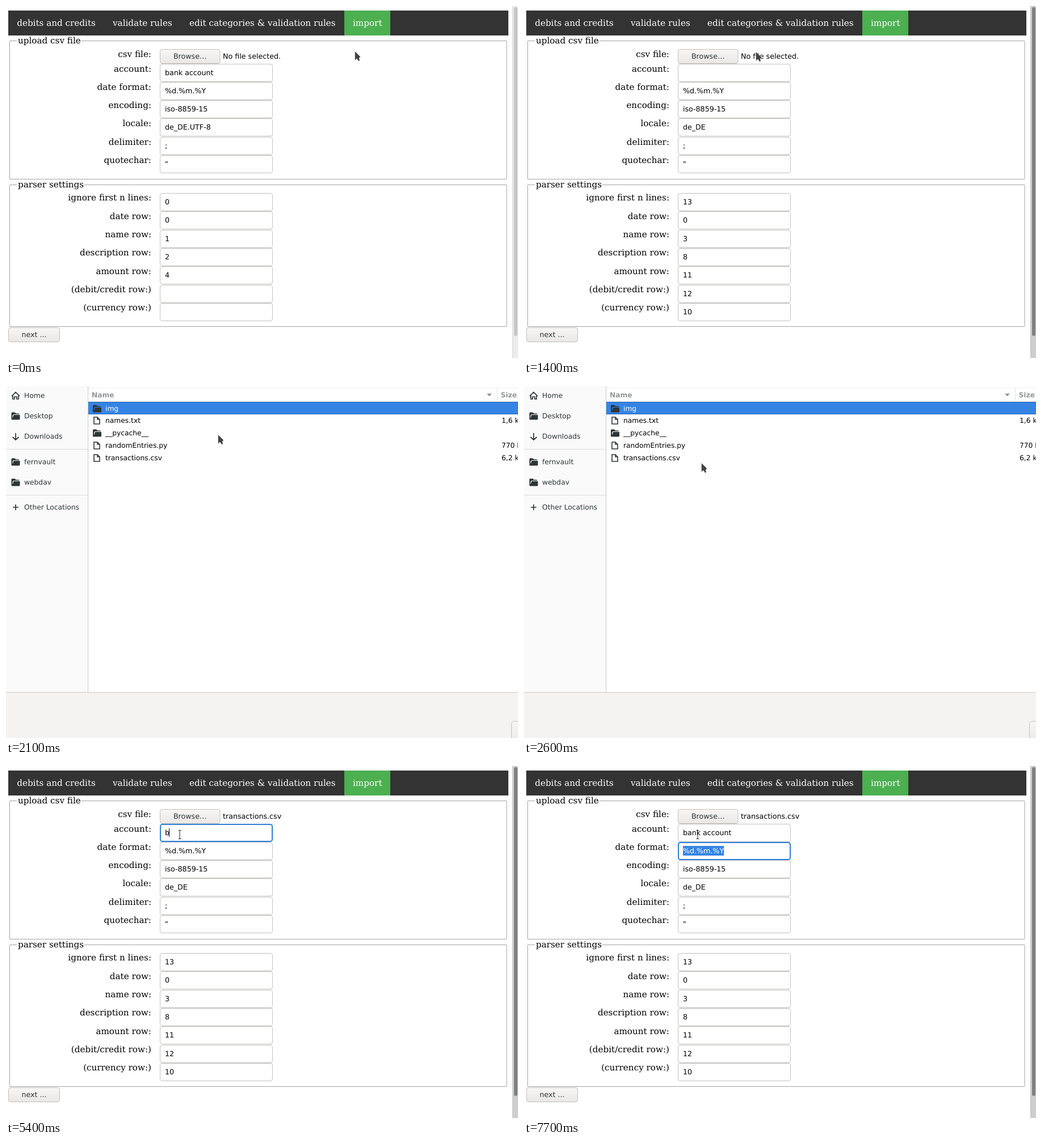
An HTML page for the animation above (8 s loop, 902 by 621 pixels).

```html
<!DOCTYPE html>
<html lang="en">
<head>
<meta charset="utf-8">
<title>CSV import</title>
<style>
  html, body { margin: 0; width: 100%; height: 100%; overflow: hidden; background: #fff; }
  svg { display: block; width: 902px; height: 621px; }
  text { white-space: pre; text-rendering: geometricPrecision; }
  .serif { font-family: "DejaVu Serif", "Noto Serif", serif; }
  .sans { font: 12.67px "DejaVu Sans", sans-serif; }
  .dialog { font: 12.27px "DejaVu Sans", sans-serif; }
  .bold { font: bold 12.27px "DejaVu Sans", sans-serif; }
  .end { text-anchor: end; }
  .mid { text-anchor: middle; }
</style>
</head>
<body>
<svg id="stage" viewBox="0 0 902 621">
  <defs>
    <linearGradient id="button" x2="0" y2="1">
      <stop stop-color="#f7f6f5"/><stop offset="1" stop-color="#eae8e6"/>
    </linearGradient>
    <linearGradient id="hover" x2="0" y2="1">
      <stop stop-color="#fbfaf9"/><stop offset="1" stop-color="#f2f1ef"/>
    </linearGradient>
  </defs>
  <g id="scene"></g>
</svg>
<script>
const LOOP = 8000, BLUE = "#3584e4", INK = "#2e3436";
const ROW = 32.3, VALUE_X = 279.9;
const scene = document.getElementById("scene");
const pen = document.createElement("canvas").getContext("2d");

function measure(text, font) {
  pen.font = font;
  return pen.measureText(text).width;
}
// The serif size follows whichever face is installed.
const serifSize = 15.2 * 138.7 /
  measure("debits and credits", '15.2px "DejaVu Serif", "Noto Serif", serif');

const rect = (x, y, w, h, fill, extra = "") =>
  `<rect x="${x}" y="${y}" width="${w}" height="${h}" fill="${fill}" ${extra}/>`;
const path = (d, extra) => `<path d="${d}" ${extra}/>`;
const text = (x, y, s, cls, fill = "#000") =>
  `<text x="${x}" y="${y}" class="${cls}" fill="${fill}"` +
  `${cls.startsWith("serif") ? ` font-size="${serifSize}"` : ""}>${s}</text>`;
const at = (x, y, s) => `<g transform="translate(${x} ${y})">${s}</g>`;

// Last entry of a [time, ...values] list that has begun at t.
const current = (steps, t) => steps.filter(s => s[0] <= t).pop();

const POINTER = [
  [0, 614, 79, "arrow"], [100, 625, 56, "arrow"], [200, 631, 38, "hand"],
  [500, 632, 25, "hand"], [1200, 575, 46, "arrow"], [1300, 480, 66, "arrow"],
  [1400, 408, 80, "arrow"], [1500, 373, 85, "arrow"], [2300, 362, 94, "arrow"],
  [2400, 338, 113, "arrow"], [2500, 320, 129, "arrow"], [2600, 312, 135, "arrow"],
  [3800, 306, 121, "beam"]
];
const TYPED = [
  [0, "bank account"], [1100, ""], [5400, "b"], [5600, "ban"], [5800, "bank "],
  [6300, "bank ac"], [6500, "bank acc"], [6800, "bank accoun"], [7000, "bank account"]
];
const HISTORY = ["bank", "bank account", "bank account 1", "bank account 2"];
const SUGGESTIONS = [
  [0, []], [5600, HISTORY], [6300, [...HISTORY.slice(1), HISTORY[3]]],
  [6500, HISTORY.slice(1)], [7700, []]
];
const STATUS = [
  [0, ""], [700, "Waiting for localhost…"],
  [1000, "Transferring data from localhost…"], [1100, ""]
];
const UPLOAD = ["account:", "date format:", "encoding:", "locale:", "delimiter:", "quotechar:"];
const PARSER = ["ignore first n lines:", "date row:", "name row:", "description row:",
  "amount row:", "(debit/credit row:)", "(currency row:)"];
const NAV = [[19.2, "debits and credits"], [188, "validate rules"],
  [323, "edit categories &amp; validation rules"], [611, "import"]];

const CURSORS = {
  arrow: path("M.5 .5V17L4 14L7 18.5L9.3 17.3L8.3 12.8L10.5 10.5Z",
    'fill="#434343" stroke="#fff" stroke-width=".6"'),
  hand: path("M2 2Q4 0 6 2L10 6Q12 4 14 6Q17 6 17 9L18 13L16 17V20H8L5 17L1 14Q0 11 4 11L7 12L2 4Z",
    'fill="#444" stroke="#fff" stroke-width="1.1"') +
    path("M10 11V15M12.5 11V15M15 11V15", 'stroke="#ddd" stroke-width=".7"'),
  beam: path("M-2.5 -7.5H-.7L0 -6.8L.7 -7.5H2.5M0 -7V7M-2.5 7.5H-.7L0 6.8L.7 7.5H2.5",
    'fill="none" stroke="#333" stroke-width="1.1"')
};

function pointer(t) {
  const [, x, y, kind] = current(POINTER, t);
  return at(x, y, CURSORS[kind]);
}

function fieldset(y, h, title, gap) {
  return rect(6.5, y + .5, 875.5, h, "none", 'stroke="#a3a3a3" rx=".5"') +
    rect(19, y - 1, gap, 3, "#fff") + text(21, y + 5, title, "serif");
}

function button(x, y, w, label, fill = "button") {
  return rect(x + .5, y + .5, w, 25, `url(#${fill})`, 'stroke="#c3beb9" rx="3.5"') +
    text(x + w / 2 + .5, y + 17, label, "sans mid", INK);
}

function field(y, value, focus) {
  const frame = focus
    ? rect(272, y + 1, 197, 30, "#fff", 'stroke="#2f7fdb" stroke-width="2" rx="3.5"')
    : rect(271.5, y + .5, 198, 31, "#fff", 'stroke="#c3c1be" rx="3.5"');
  const selected = focus === "select";
  const width = focus ? measure(value, '12.67px "DejaVu Sans", sans-serif') : 0;
  const mark = selected ? rect(280, y + 7, width, 17, BLUE) : "";
  const caret = focus === "caret" ? rect(Math.floor(VALUE_X + width), y + 8, 1, 15, "#000") : "";
  return frame + mark + text(VALUE_X, y + 20, value, "sans", selected ? "#fff" : "#000") + caret;
}

function fields(top, labelTop, labels, values, focus = {}) {
  return labels.map((label, i) =>
    text(256, Math.floor(labelTop + ROW * i), label, "serif end") +
    field(Math.floor(top + ROW * i), values[i], focus[i])).join("");
}

function popup(rows) {
  if (!rows.length) return "";
  return rect(271.5, 135.5, 197, rows.length * 19 + 1, "#fff", 'stroke="#bab6b2"') +
    rows.map((row, i) => text(VALUE_X, 150 + 19 * i, row, "sans")).join("");
}

function navigation(t) {
  const hovered = t >= 200 && t < 1200;
  const outline = t >= 700 && t < 1100
    ? rect(595.5, 8.5, 82, 43, "none", 'stroke="#fff" stroke-dasharray="1 1"') : "";
  return rect(4, 8, 881, 44, "#333") +
    rect(596, 8, 81, 44, hovered ? "#111" : "#4caf50") + outline +
    NAV.map(([x, label]) => text(x, 35, label, "serif", "#fff")).join("");
}

function browse(t) {
  const over = t >= 1500 && t < 2100;
  const pressed = t >= 1700 && t < 1800;
  const ring = t >= 1700 && t < 4400
    ? rect(274.5, 79.5, 100, 19, "none", t < 3800
      ? 'stroke="#aaa7a4" stroke-dasharray="1 1" rx="2"'
      : 'stroke="#b5b1ad" rx="2"') : "";
  return button(271, 76, 105.5, "Browse…", over ? "hover" : "button") +
    (pressed ? rect(272, 77, 104.5, 24, "#000", 'opacity=".12" rx="3"') : "") + ring +
    text(382, 93, t < 3800 ? "No file selected." : "transactions.csv", "sans");
}

function scrollbar(active) {
  return rect(892, 0, 10, 621, active ? "#cecece" : "#ebebeb") +
    rect(892, 0, 1, 621, active ? "#c2c2c2" : "#d4d4d4") +
    rect(895, 2, 6, 580, active ? "#7e8080" : "#c6c6c6", 'rx="3"');
}

function status(message) {
  return message && rect(-2.5, 608.5, 276, 20, "#f1f0ee", 'stroke="#b9b5b1" rx="2.5"') +
    text(0, 622, message, "dialog", INK);
}

function form(t) {
  const fresh = t >= 1100;
  const focus = t >= 7700 ? { 1: "select" } : t >= 4400 ? { 0: "caret" } : {};
  const upload = [current(TYPED, t)[1], "%d.%m.%Y", "iso-8859-15",
    fresh ? "de_DE" : "de_DE.UTF-8", ";", "&quot;"];
  const parser = fresh ? [13, 0, 3, 8, 11, 12, 10] : [0, 0, 1, 2, 4, "", ""];
  return navigation(t) +
    fieldset(61, 244, "upload csv file", 114) +
    text(256, 90, "csv file:", "serif end") + browse(t) +
    fields(102, 116, UPLOAD, upload, focus) +
    fieldset(315, 250, "parser settings", 119) +
    fields(330.5, 343.8, PARSER, parser) +
    button(4, 567, 90, "next ...") +
    popup(current(SUGGESTIONS, t)[1]) + scrollbar(t >= 700) + status(current(STATUS, t)[1]);
}

const ICONS = {
  folder: path("M1 13.5Q0 13.5 0 12V2Q0 .5 1.5 .5H6L8 2.5H12.5Q14 2.5 14 4H3.5L2 6V11L4 5H15V12Q15 13.5 13.5 13.5Z",
    `fill="${INK}"`),
  file: path("M1 1H7L11 5V13H1ZM7 1V5H11", `fill="none" stroke="${INK}" stroke-width="1.6"`),
  home: path("M.5 8L7.5 1L14.5 8M2.5 7V13H5.5V9H9.5V13H12.5V7",
    `fill="none" stroke="${INK}" stroke-width="1.7"`),
  down: path("M7.5 1V13M2 8L7.5 13L13 8", `fill="none" stroke="${INK}" stroke-width="1.7"`),
  plus: path("M7.5 2V12M2.5 7H12.5", `stroke="${INK}" stroke-width="1.7"`)
};
const PLACES = [[17, "home", "Home"], [53, "folder", "Desktop"], [89, "down", "Downloads"],
  [134, "folder", "fernvault"], [170, "folder", "webdav"], [214, "plus", "Other Locations"]];
const FILES = [["folder", "img", ""], ["file", "names.txt", "1,6 kB"],
  ["folder", "__pycache__", ""], ["file", "randomEntries.py", "770 bytes"],
  ["file", "transactions.csv", "6,2 kB"]];

function fileDialog() {
  const places = PLACES.map(([y, icon, label]) =>
    at(9.5, y - 7, ICONS[icon]) + text(32, y + 4, label, "dialog", INK)).join("");
  const files = FILES.map(([icon, name, size], i) => {
    const y = Math.floor(44 + 21.8 * i), fill = i ? "#000" : "#fff";
    return at(icon === "file" ? 154 : 153, y - 11, ICONS[icon]) +
      text(175, y, name, "dialog", fill) + text(873, y, size, "dialog");
  }).join("");
  return rect(0, 0, 144, 541, "#fafafa") + rect(144, 0, 1, 541, "#d0cac5") +
    rect(0, 111, 144, 1, "#dedcda") + rect(0, 192, 144, 1, "#dedcda") + places +
    rect(145, 3, 757, 1, "#f0efee") + rect(145, 27, 757, 1, "#e4e2e0") +
    rect(865, 4, 1, 23, "#e4e2e0") +
    text(151, 20, "Name", "bold", "#949798") + text(871.5, 20, "Size", "bold", "#949798") +
    path("M847 13.5H856L851.5 18Z", 'fill="#8b8e8f"') +
    rect(145, 28, 757, 22, BLUE) + rect(145, 28, 757, 1, "#1c66bd") +
    rect(145, 49, 757, 1, "#1c66bd") + files +
    rect(0, 541, 902, 80, "#f4f3f2") + rect(0, 540, 902, 1, "#cfc9c4") +
    rect(890.5, 591.5, 80, 40, "url(#button)", 'stroke="#c3beb9" rx="5"');
}

let shown = "";
function draw(t) {
  const picture = (t >= 2100 && t < 3800 ? fileDialog() : form(t)) + pointer(t);
  if (picture !== shown) scene.innerHTML = shown = picture;
}

const start = performance.now();
function tick(now) {
  draw(Math.max(0, now - start) % LOOP);
  requestAnimationFrame(tick);
}
tick(start);
</script>
</body>
</html>
```
